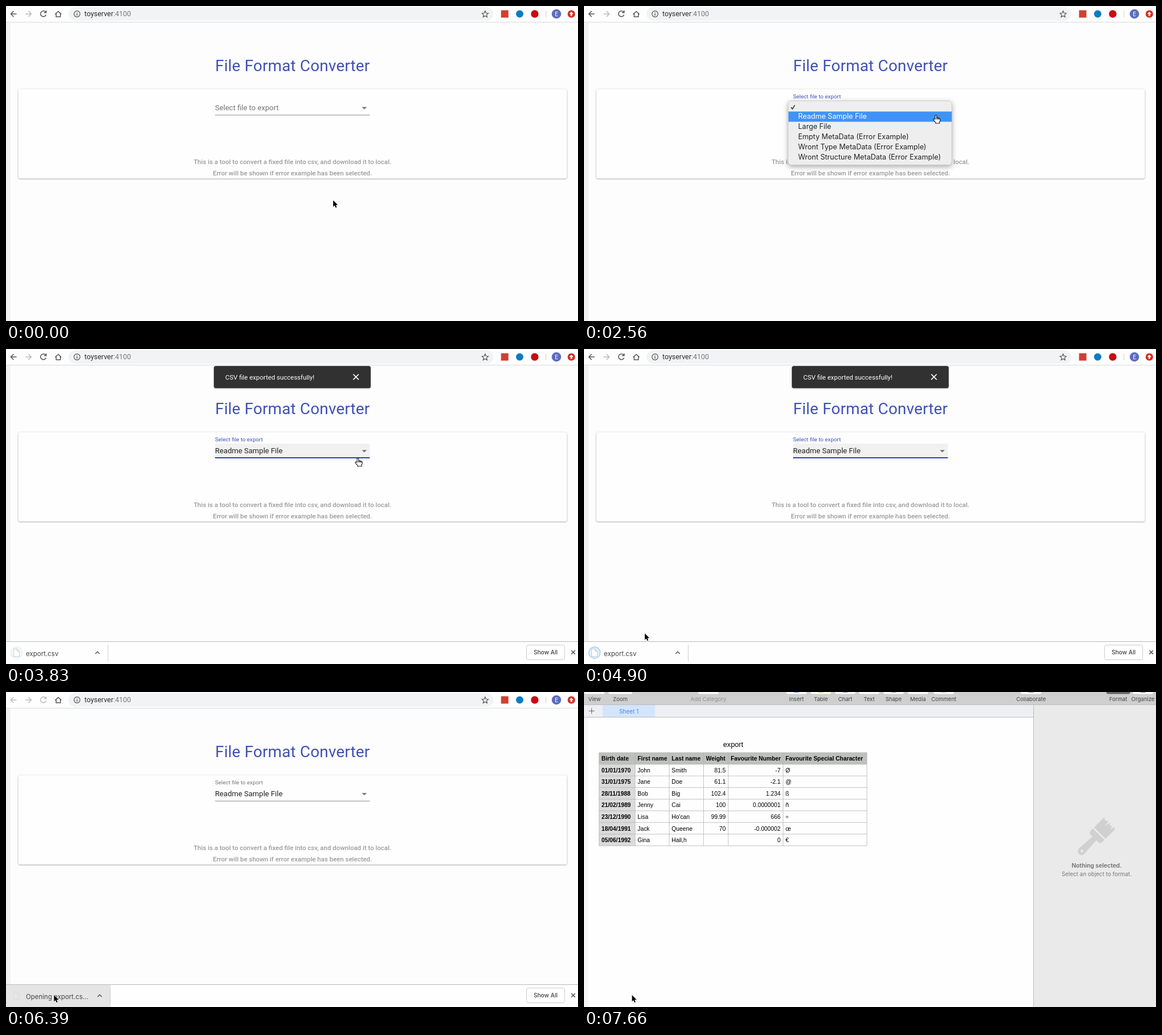
An HTML page for the animation above (8000 ms loop, 1007 px wide and 556 px high).

```html
<!DOCTYPE html>
<html lang="en">
<head>
<meta charset="utf-8">
<title>File Format Converter</title>
<style>
  html, body { margin: 0; width: 100%; height: 100%; overflow: hidden; background: #fdfdfd; }
  svg { display: block; }
  text { font-family: Roboto, sans-serif; white-space: pre; }
  .ui text, text.ui { font-family: Inter, sans-serif; }
  .mid { text-anchor: middle; }
  .end { text-anchor: end; }
  .line { fill: none; stroke: #505357; stroke-width: 1.5; }
  .card { filter: drop-shadow(0 1px 1px #0004) drop-shadow(0 0 1px #0002); }
  .pop { filter: drop-shadow(0 3px 5px #0005); }
  .help { font-size: 11.48px; font-weight: 500; fill: #9b9b9b; }
  .cell text { font: 10.3px "Liberation Sans", Arial, sans-serif; }
  .cell .bold { font-weight: bold; }
</style>
</head>
<body>
<svg width="1007" height="556" viewBox="0 0 1007 556">
  <rect width="1007" height="556" fill="#fdfdfd"/>
  <rect y="29" width="8" height="527" fill="#f2f2f2"/>

  <g id="page">
    <text x="504.4" y="115" class="mid" font-size="27.9" letter-spacing=".205" fill="#3f51b5">File Format Converter</text>
    <rect class="card" x="21.5" y="147" width="966" height="157.5" rx="3.5" fill="#fefefe"/>
    <rect id="focusFill" x="368" y="167" width="272.5" height="25" fill="#f1f1f1"/>
    <text id="label" x="368"></text>
    <text id="value" x="368" y="184.3" font-size="13.1" fill="#222">Readme Sample File</text>
    <path d="M626.5 178.3h8.6l-4.3 4.2z" fill="#757575"/>
    <rect id="rule" x="368" width="272.5"/>
    <rect id="focusRule" y="191" height="2" fill="#3040ac"/>
    <text x="504.3" y="279.3" class="mid help">This is a tool to convert a fixed file into csv, and download it to local.</text>
    <text x="504.3" y="299.2" class="mid help">Error will be shown if error example has been selected.</text>
  </g>

  <g id="toast">
    <rect class="card" x="366" y="30" width="276" height="39" rx="3.5" fill="#313131"/>
    <text x="386" y="53.5" font-size="11.48" fill="#fff">CSV file exported successfully!</text>
    <path d="M611.3 44.5l9.6 9.6m0-9.6l-9.6 9.6" stroke="#fff" stroke-width="1.7"/>
  </g>

  <g id="menu" class="ui" font-size="12.6">
    <rect class="pop" x="359.5" y="167.5" width="288" height="113" rx="5" fill="#eee" stroke="#c4c4c4" stroke-width=".7"/>
    <rect id="highlight" x="360" width="287.5" fill="#3f93f7"/>
    <path id="tick" d="M364.5 178.8l2.4 3 4.3-6.6" fill="none" stroke-width="1.5"/>
    <g id="options"></g>
  </g>

  <g id="shelf" class="ui">
    <rect y="516" width="1007" height="60" fill="#fefefe"/>
    <path d="M0 516.5h1007" stroke="#b9b9b9"/>
    <g id="item">
      <rect id="pressed" y="517" width="184" height="39" fill="#e5e5e5"/>
      <circle id="ring" cx="18.5" cy="536" r="10" fill="#e3eefa" stroke="#a9cbee" stroke-width="1.4"/>
      <path id="doc" d="M13.5 529.5h6l4 4v9h-10zM19.5 529.5v4h4" fill="#fff" stroke="#b9c1ca" stroke-width=".8"/>
      <text id="fileName" x="35" y="542" font-size="11.5" fill="#444"></text>
      <g id="itemEnd">
        <path d="M161.3 538l3.7-3.7 3.7 3.7" class="line" stroke-width="1.3"/>
        <path d="M183.5 522v29" stroke="#cdcdcd"/>
      </g>
    </g>
    <rect x="916.5" y="522.5" width="67" height="26" rx="3" fill="#fff" stroke="#cbcbcb"/>
    <text x="950" y="539" class="mid" font-size="10.2" font-weight="500" fill="#3e4043">Show All</text>
    <path d="M995.3 532l6.6 6.6m0-6.6l-6.6 6.6" class="line"/>
  </g>

  <g id="toolbar">
    <rect width="1007" height="29" fill="#fefefe"/>
    <path d="M0 28.5h1007" stroke="#d8dadc"/>
    <path id="back" class="line" d="M18.5 14H8.5m5-5l-5 5 5 5"/>
    <path class="line" style="stroke:#b9bbbd" d="M34.5 14h10m-5-5l5 5-5 5"/>
    <path id="reload" class="line" d="M70 11a5 5 0 1 0 .5 4.5M70.7 8v3.8h-3.8"/>
    <path class="line" d="M86.5 14.5l5.5-5 5.5 5M88.3 13v6h7.4v-6"/>
    <rect x="110" y="2" width="748" height="24" rx="12" fill="#f1f3f4"/>
    <circle cx="125" cy="14" r="5.3" class="line" style="stroke-width:1.2"/>
    <path d="M125 13v4m0-6.3v1.3" class="line" style="stroke-width:1.3"/>
    <text x="138" y="18.3" font-size="12.45" fill="#2b2d30">toyserver<tspan fill="#75797d">:4100</tspan></text>
    <path class="line" style="stroke-width:1.2" d="M843.5 8.8l1.6 3.7 4 .4-3 2.7.9 3.9-3.5-2.1-3.5 2.1.9-3.9-3-2.7 4-.4z"/>
    <rect x="871.5" y="7.5" width="13" height="13" fill="#cf4030"/>
    <circle cx="904.3" cy="14" r="6.5" fill="#0b7cc4"/>
    <circle cx="930.8" cy="14" r="6.7" fill="#c70d12"/>
    <path d="M950.5 8v12" stroke="#d0d2d4"/>
    <circle cx="969" cy="14" r="8.3" fill="#5c6bc0"/>
    <text x="969" y="17.6" class="mid" font-size="10" fill="#fff">E</text>
    <circle cx="995.3" cy="14" r="6.6" fill="#d62d22"/>
    <path d="M995.3 10l3.6 4h-2.2v3.5h-2.8V14h-2.2z" fill="#fff"/>
  </g>

  <g id="sheet" class="ui">
    <rect width="1007" height="556" fill="#fefefe"/>
    <rect y="45" width="7.5" height="511" fill="#f5f5f5"/>
    <rect width="1007" height="22" fill="#cfcfcf"/>
    <g id="tools" font-size="9.6"></g>
    <rect y="22" width="791" height="22" fill="#edeff3"/>
    <rect x="33" y="22" width="92" height="22" fill="#d3e5fc"/>
    <path d="M0 22.5h1007M0 44.5h791M791.5 22v534" stroke="#bcbcbc"/>
    <path d="M8.5 33.5h10m-5-5v10" stroke="#666"/>
    <text x="79" y="37.7" class="mid" font-size="10" fill="#3b8bea">Sheet 1</text>
    <rect x="792" y="23" width="215" height="533" fill="#eaeaea"/>
    <g transform="translate(902 255) rotate(45) scale(.95)" fill="#d0d0d0">
      <path d="M-15-36Q-9-30-4-36L-3-25L0-36Q4-29 7-35L9-27L11-36L15-33V-9H-15zM-15-6H15V0Q15 5 10 5H5L7 39Q6 46 0 46T-7 39L-5 5H-10Q-15 5-15 0z"/>
      <circle cy="38" r="2.5" fill="#eaeaea"/>
    </g>
    <text x="902.5" y="310" class="mid" font-size="10.3" font-weight="600" fill="#6d6d6d">Nothing selected.</text>
    <text x="902.5" y="325" class="mid" font-size="9.9" fill="#777">Select an object to format.</text>
    <g id="table" class="cell"></g>
  </g>

  <g id="cursor">
    <path id="arrow" transform="scale(.9)" d="M0 0V12.6L2.9 9.9L4.9 14.4L7 13.5L5.1 9.1H9.1Z" fill="#000" stroke="#fff" stroke-width="1" paint-order="stroke"/>
    <g id="hand" stroke="#111" stroke-width="1.1" fill="#fff">
      <path d="M-1.4 7.5V1.2Q-1.4 0 0 0T1.4 1.2V5Q2.6 4 3.6 5.3Q5 4.6 5.8 6Q7.6 5.6 7.6 7.5V10L6.4 12.5V14.5H-.6V13L-4.4 8.6Q-5 7-3.4 6.8Z"/>
      <path d="M1.4 5V8M3.7 5.5V8M5.8 6V8" fill="none"/>
    </g>
  </g>
</svg>
<script>
const $ = id => document.getElementById(id);
const set = (id, attrs) => { for (const k in attrs) $(id).setAttribute(k, attrs[k]); };
const show = (id, on) => { $(id).style.display = on ? '' : 'none'; };

const options = ['Readme Sample File', 'Large File', 'Empty MetaData (Error Example)',
  'Wront Type MetaData (Error Example)', 'Wront Structure MetaData (Error Example)'];
$('options').innerHTML = options.map((s, i) => `<text x="377" y="${199 + i * 18}" fill="#222">${s}</text>`).join('');

// Spreadsheet toolbar: label, centre, icon colour
const tools = [['View', 18.5], ['Zoom', 64], ['Add Category', 219], ['Insert', 374, '#3a9bf0'], ['Table', 417, '#f5b93a'],
  ['Chart', 460, '#4aa8f0'], ['Text', 502], ['Shape', 545, '#4cd07a'], ['Media', 588], ['Comment', 633.5, '#f5bd45'],
  ['Collaborate', 787, '#888'], ['Format', 940.5], ['Organize', 984, '#777']];
$('tools').innerHTML = tools.map(([name, x, tint]) => {
  const wide = name === 'Zoom' || name === 'Format' ? 21 : 18;
  return `<rect x="${x - wide}" y="-8" width="${wide * 2}" height="11.5" rx="3" fill="${name === 'Format' ? '#666' : '#fafafa'}"/>` +
    (tint ? `<rect x="${x - 5}" y="-4" width="10" height="5" rx="2" fill="${tint}"/>` : '') +
    `<text x="${x}" y="16.3" class="mid" fill="${name === 'Add Category' ? '#929292' : '#444'}">${name}</text>`;
}).join('');

const columns = [26.5, 90, 150, 210.5, 254, 350.5, 498];
const rows = `Birth date|First name|Last name|Weight|Favourite Number|Favourite Special Character
01/01/1970|John|Smith|81.5|-7|Ø
31/01/1975|Jane|Doe|61.1|-2.1|@
28/11/1988|Bob|Big|102.4|1.234|ß
21/02/1989|Jenny|Cai|100|0.0000001|ñ
23/12/1990|Lisa|Ho'can|99.99|666|÷
18/04/1991|Jack|Queene|70|-0.000002|œ
05/06/1992|Gina|Hail,h||0|€`.split('\n').map(r => r.split('|'));
const rowY = i => 107 + i * 20.55;
let grid = '', cells = '';
rows.forEach((row, r) => {
  grid += `M26.5 ${rowY(r)}H498`;
  row.forEach((s, c) => {
    const right = r && (c === 3 || c === 4);
    cells += `<text x="${right ? columns[c + 1] - 4.5 : columns[c] + 4.3}" y="${rowY(r) + 14.2}" class="${right ? 'end' : ''} ${r && c ? '' : 'bold'}">${s}</text>`;
  });
});
columns.forEach(x => grid += `M${x} 107V271.4`);
$('table').innerHTML = `<text x="262.7" y="97" class="mid" style="font-size:12.7px">export</text>
  <rect x="26.5" y="107" width="63.5" height="164.4" fill="#dbdbdb"/>
  <rect x="26.5" y="107" width="471.5" height="20.5" fill="#bdc0bc"/>
  <path d="${grid}M26.5 271.4H498" stroke="#b4b4b4" stroke-width=".8"/>${cells}`;

const ticks = [0, 600, 780, 895, 1010, 1125, 1240, 1840, 1960, 2320, 2440, 2560, 2800, 2917, 3033, 3150, 3300, 3450, 3650,
  3830, 3950, 4070, 4240, 4390, 4540, 4660, 4780, 4900, 5020, 5140, 5260, 5380, 5560, 5730, 6210, 6390, 7550, 7660];
// Pointer path: time, x, y
const path = [[0, 576, 343], [599, 576, 343], [600, 588, 328], [780, 603, 292], [1010, 637, 202], [1240, 628.5, 178.5],
  [2200, 628.5, 178.5], [2560, 619.5, 192.5], [3830, 619.5, 192.5], [3950, 585, 215], [4070, 512, 252], [4240, 222, 374],
  [4390, 145, 447], [4540, 115, 490], [4900, 107, 502], [5260, 84.5, 535], [8000, 84.5, 535]];

function pointer(t) {
  const i = path.findIndex(p => p[0] > t), a = path[i - 1], b = path[i];
  const k = (t - a[0]) / (b[0] - a[0]);
  return [a[1] + (b[1] - a[1]) * k, a[2] + (b[2] - a[2]) * k];
}

function draw(now) {
  const t = ticks.filter(m => m <= now).pop();
  const between = (a, b) => t >= a && t < b;

  set('cursor', { transform: `translate(${pointer(t)})` });
  show('hand', between(1125, 3950));
  show('arrow', !between(1125, 3950));

  const opened = t >= 1840, focused = between(1840, 6210), hovered = between(1125, 1840);
  $('label').textContent = 'Select file to export';
  set('label', { y: opened ? 163.2 : 184.3, 'font-size': opened ? 9.83 : 13.1,
    fill: focused ? '#3f51b5' : t === 6210 ? '#5c6694' : '#757575' });
  show('value', t >= 3150);
  show('focusFill', focused);
  set('rule', { y: hovered ? 191 : 192, height: hovered ? 2 : 1, fill: hovered ? '#1c1c1c' : '#8f8f8f' });
  const half = focused ? 136.2 : t === 6210 ? 59 : 0;
  set('focusRule', { x: 504.2 - half, width: half * 2 });

  show('menu', between(1840, 3150));
  const onFirst = between(2440, 2800) || t >= 2917, onBlank = between(1960, 2440);
  show('highlight', onFirst || onBlank);
  set('highlight', onBlank ? { y: 172, height: 14.3 } : { y: 186.3, height: 18 });
  set('tick', { stroke: onBlank ? '#fff' : '#222' });
  $('options').firstChild.setAttribute('fill', onFirst ? '#fff' : '#222');
  set('menu', { opacity: t === 3033 ? .5 : 1 });

  show('toast', between(3300, 5380));
  set('toast', { transform: `translate(0 ${t === 3300 || t === 5260 ? -20 : 0})` });

  show('shelf', t >= 3300);
  set('shelf', { transform: `translate(0 ${t === 3300 ? 20 : 0})` });
  show('pressed', t >= 6210);
  set('ring', { opacity: t < 5730 ? .65 - .35 * Math.cos((t - 3830) / 430 * 2 * Math.PI) : 0 });
  set('doc', { opacity: t >= 6390 ? .35 : 1, fill: t >= 6210 ? '#e9e9e9' : '#fff' });
  $('fileName').textContent = t >= 6390 ? 'Opening export.cs...' : 'export.csv';
  set('itemEnd', { transform: `translate(${t < 3950 ? -4 : 0} 0)` });

  for (const id of ['back', 'reload']) $(id).style.stroke = t >= 6390 ? '#b9bbbd' : '';
  show('sheet', t >= 7550);
  set('sheet', { opacity: t === 7550 ? .6 : 1 });
}

const start = performance.now();
function loop() {
  draw((performance.now() - start) % 8000);
  requestAnimationFrame(loop);
}
loop();
</script>
</body>
</html>
```
